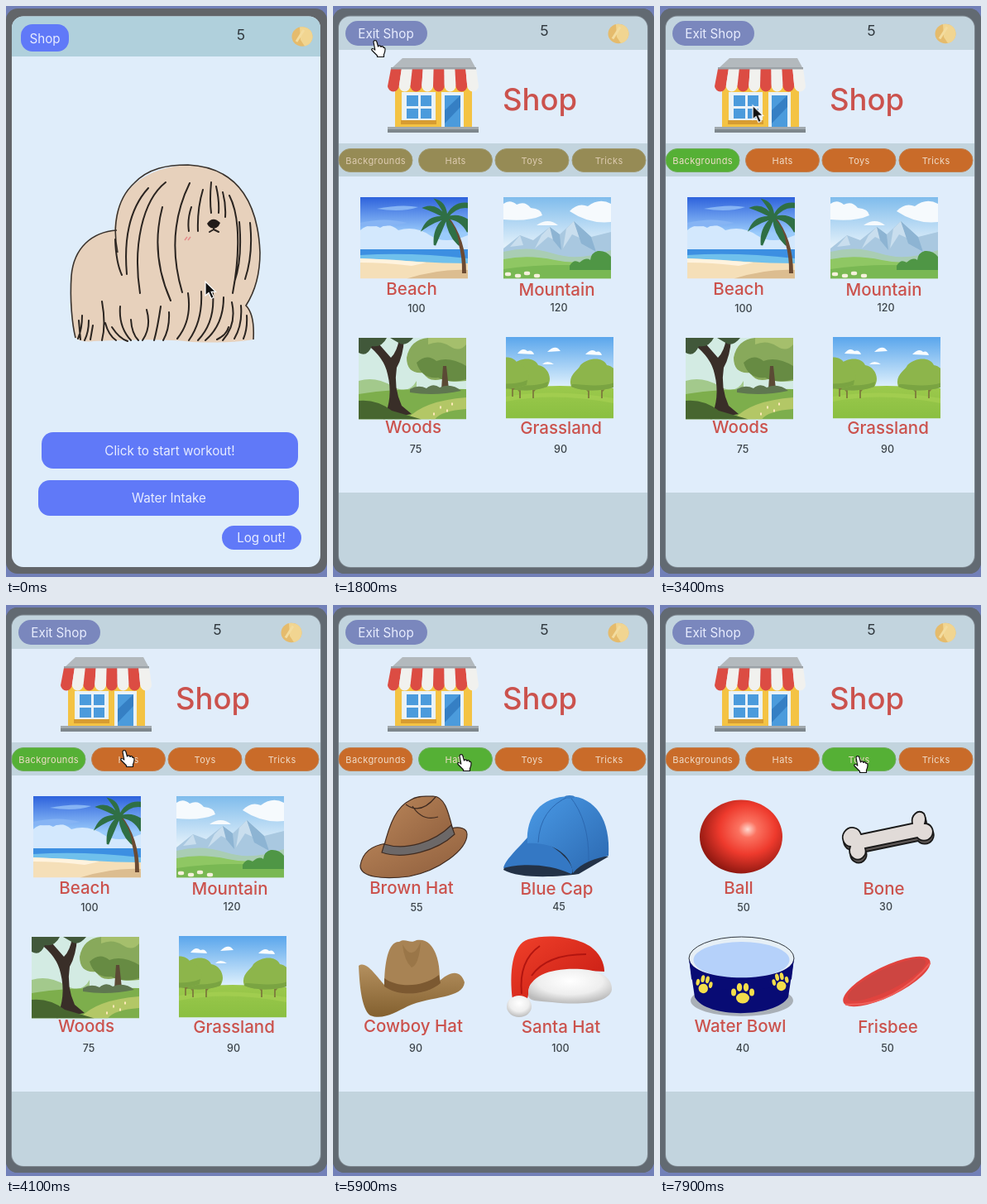
An HTML page for the animation above (8000 ms loop, 388 by 690 pixels).

```html
<!DOCTYPE html>
<html lang="en">
<head>
<meta charset="utf-8">
<title>Pet shop</title>
<style>
html, body { margin: 0; width: 100%; height: 100%; overflow: hidden; background: #7280b8; }
#stage { display: block; width: 100vw; height: 100vh; }
text { font-family: Inter, Roboto, sans-serif; text-anchor: middle; }
.btn { font-size: 15.2px; fill: #e8edff; }
.coins { font-size: 17.5px; fill: #30383e; }
.name { font-size: 20.5px; font-weight: 500; fill: #cb524d; }
.price { font-size: 12.5px; font-weight: 500; fill: #3c444a; }
.tab rect { fill: #c96b29; stroke: #b4662f; }
.tab text { font-size: 11px; letter-spacing: .4px; fill: #f0dcc8; }
.line { fill: none; stroke: #2a2420; stroke-width: 2; stroke-linecap: round; stroke-linejoin: round; }

.home, .shop, .p1, .p2, .p3, .hand, .arrow { animation: 8s step-end infinite; }
.home { animation-name: home; }
.shop { animation-name: shop; }
.p1 { animation-name: p1; }
.p2 { animation-name: p2; }
.p3 { animation-name: p3; }
.hand { animation-name: hand; }
.arrow { animation-name: arrow; }
.press { animation: press 8s step-end infinite; }
.t1 rect { animation: t1 8s linear infinite; }
.t2 rect { animation: t2 8s linear infinite; }
.t3 rect { animation: t3 8s linear infinite; }
.t4 rect { animation: t4 8s linear infinite; }
.tab text { animation: dim 8s linear infinite; }
.cursor { animation: move 8s ease-in-out infinite; }

@keyframes home { 0% { opacity: 1 } 22.45%, 100% { opacity: 0 } }
@keyframes shop { 0% { opacity: 0 } 22.45%, 100% { opacity: 1 } }
@keyframes p1 { 0% { opacity: 1 } 67.45%, 100% { opacity: 0 } }
@keyframes p2 { 0% { opacity: 0 } 67.45% { opacity: 1 } 89.95%, 100% { opacity: 0 } }
@keyframes p3 { 0% { opacity: 0 } 89.95%, 100% { opacity: 1 } }
@keyframes press { 0% { fill: #6079f8 } 19.95%, 100% { fill: #6b7fe0 } }
@keyframes t1 {
  0%, 22.8% { fill: #968b55; stroke: #a09a72 }
  25.5%, 67.45% { fill: #55b035; stroke: #6fae5c }
  67.46%, 100% { fill: #c96b29; stroke: #c08152 }
}
@keyframes t2 {
  0%, 22.8% { fill: #968b55; stroke: #a09a72 }
  25.5%, 67.45% { fill: #c96b29; stroke: #c08152 }
  67.46%, 89.95% { fill: #55b035; stroke: #6fae5c }
  89.96%, 100% { fill: #c96b29; stroke: #c08152 }
}
@keyframes t3 {
  0%, 22.8% { fill: #968b55; stroke: #a09a72 }
  25.5%, 89.95% { fill: #c96b29; stroke: #c08152 }
  89.96%, 100% { fill: #55b035; stroke: #6fae5c }
}
@keyframes t4 {
  0%, 22.8% { fill: #968b55; stroke: #a09a72 }
  25.5%, 100% { fill: #c96b29; stroke: #c08152 }
}
@keyframes dim { 0%, 22.8% { opacity: .8 } 25.5%, 100% { opacity: 1 } }
@keyframes hand { 0% { opacity: 0 } 12% { opacity: 1 } 31% { opacity: 0 } 47.4%, 100% { opacity: 1 } }
@keyframes arrow { 0% { opacity: 1 } 12% { opacity: 0 } 31% { opacity: 1 } 47.4%, 100% { opacity: 0 } }
@keyframes move {
  0%, 1% { transform: translate(241px, 333px) }
  15%, 28% { transform: translate(50px, 42px) }
  35% { transform: translate(82px, 64px) }
  50%, 52% { transform: translate(142px, 176px) }
  59%, 77.5% { transform: translate(154px, 181px) }
  86.5%, 100% { transform: translate(238px, 183px) }
}
</style>
</head>
<body>
<svg id="stage" viewBox="0 0 388 690" preserveAspectRatio="none">
<defs>
  <clipPath id="screen"><rect x="7" y="12.500" width="373" height="665.500" rx="14"/></clipPath>
  <linearGradient id="sky" x2="0" y2="1"><stop stop-color="#5aa6ec"/><stop offset=".6" stop-color="#dceffc"/></linearGradient>
  <linearGradient id="haze" x2="0" y2="1"><stop stop-color="#7fbcec"/><stop offset=".6" stop-color="#e2f0fa"/></linearGradient>
  <linearGradient id="deep" x2="0" y2="1"><stop stop-color="#2d62dc"/><stop offset=".66" stop-color="#9acbfb"/></linearGradient>
  <linearGradient id="grass" x2="0" y2="1"><stop stop-color="#9cc94c"/><stop offset="1" stop-color="#8abf42"/></linearGradient>
  <linearGradient id="cap" x2="1" y2="1"><stop stop-color="#4a9ae6"/><stop offset="1" stop-color="#2b68b0"/></linearGradient>
  <linearGradient id="felt" x2="1" y2="1"><stop stop-color="#b98559"/><stop offset="1" stop-color="#8d5d3c"/></linearGradient>
  <linearGradient id="tan" x2="0" y2="1"><stop stop-color="#b4905f"/><stop offset="1" stop-color="#83602f"/></linearGradient>
  <linearGradient id="red" x2="1" y2="1"><stop stop-color="#f0402a"/><stop offset="1" stop-color="#c41a12"/></linearGradient>
  <radialGradient id="fur" cx=".5" cy=".35" r=".65"><stop stop-color="#fff"/><stop offset=".6" stop-color="#eee"/><stop offset="1" stop-color="#bbb"/></radialGradient>
  <radialGradient id="ball" cx=".58" cy=".4" r=".62"><stop stop-color="#ffd9cf"/><stop offset=".18" stop-color="#fb7260"/><stop offset=".55" stop-color="#ee3a2d"/><stop offset="1" stop-color="#8e1710"/></radialGradient>
  <g id="coin"><ellipse rx="12.500" ry="11.800" fill="#e5bb6c"/><path d="M-3-11.500A12.500 11.800 0 0 1 3 11.500L-2 4Z" fill="#f1d591"/><path d="M-7 6L2-8" stroke="#f3dc9f" stroke-width="3"/></g>
  <g id="paw"><ellipse cy="4" rx="8" ry="6.5"/><ellipse cx="-11" cy="-3" rx="3" ry="4.5"/><ellipse cx="-4" cy="-9" rx="3.2" ry="5"/><ellipse cx="4" cy="-9" rx="3.2" ry="5"/><ellipse cx="11" cy="-3" rx="3" ry="4.5"/></g>
  <path id="bone" d="M243 277L305 264C303 254 312 246 319 252C322 257 321 261 320 264C327 264 333 272 328 280C323 287 314 285 311 281L248 294C251 303 242 311 234 306C229 303 228 297 230 292C222 291 218 281 223 274C229 266 240 268 243 277Z" stroke="#191919" stroke-width="1.800"/>
  <g id="tree"><path d="M-8 5V20M8 5V20M-8 12L-14 5M8 12L14 5" stroke="#7d7a3c" stroke-width="1.800" fill="none"/><path d="M-29 6C-34-8-20-14-18-20C-8-30 10-30 14-20C26-18 32-4 25 6C10 12-16 12-29 6Z" fill="#8db54b"/><path d="M-28 3C-14 3 8 8 26 0L25 6C10 12-16 12-29 6Z" fill="#7aa442"/></g>
</defs>

<rect width="388" height="690" fill="#7280b8"/>
<rect y="3" width="388" height="683" rx="14" fill="#626569"/>

<g class="home">
  <g clip-path="url(#screen)">
    <rect width="388" height="690" fill="#dfedfa"/>
    <rect width="388" height="61" fill="#b0d0dc"/>
  </g>
  <rect class="press" x="18" y="22" width="58" height="33" rx="14"/>
  <text class="btn" x="47" y="45">Shop</text>
  <text class="coins" x="284" y="41">5</text>
  <use href="#coin" x="358" y="37"/>
  <g fill="#6079f8">
    <rect x="43" y="515" width="310" height="44" rx="14"/>
    <rect x="39" y="573" width="315" height="43" rx="14"/>
    <rect x="261" y="628" width="96" height="29" rx="14.5"/>
  </g>
  <text class="btn" x="198" y="543">Click to start workout!</text>
  <text class="btn" x="197" y="600">Water Intake</text>
  <text class="btn" x="308.500" y="648">Log out!</text>

  <g stroke="#39322c" stroke-width="1.6" fill="#e7d1bc">
    <path d="M134 271C104 273 82 292 79 326C77 355 80 385 84 401Q92 407 106 405Q190 401 225 406Q270 408 299 403C300 386 298 370 291 361C301 345 307 322 307 298C305 245 285 195 220 192C168 195 132 222 131 271" stroke="none"/>
    <path d="M134 271C104 273 82 292 79 326C77 355 80 385 84 401" fill="none"/>
    <path d="M135 298C129 270 132 235 155 214C172 196 195 192 220 192C285 195 305 245 307 298C307 322 301 345 290 362C298 370 300 386 299 403" fill="none"/>
  </g>
  <path class="line" d="M132 282Q133 310 140 325M172 220Q140 255 146 324M193 213C165 235 153 290 162 347M189 243Q174 300 199 356M222 214Q192 275 213 346M224 243Q219 258 221 272M238 222Q231 245 232 272M248 213Q246 235 248 250M254 218Q258 235 257 250M262 225Q266 240 265 255M270 229C286 260 280 315 274 347M282 261Q286 305 276 334M295 262Q299 300 289 330"/>
  <path class="line" d="M92 374Q92 390 87 402M100 380Q100 394 95 404M88 380L90 403M105 386L102 403M116 357Q121 385 116 404M120 383Q124 398 133 404M138 363Q136 388 151 404M128 388Q137 402 147 405M151 379Q152 396 160 404M170 367Q176 388 165 404M187 363Q183 390 179 404M197 370Q198 390 190 404M220 347Q225 380 207 402M236 345Q238 380 221 404M250 347Q253 382 232 404M263 352Q263 385 241 404M273 358Q279 385 262 404M284 362Q286 385 276 402M269 388Q266 398 255 403M291 374Q292 390 287 402"/>
  <path d="M243 263Q250 253 259 262Q257 268 251 269Q245 268 243 263Z" fill="#211b19"/>
  <path class="line" d="M251 267V270L246 273M251 270L257 273"/>
  <path d="M216 283L219 279M220 283L223 279" stroke="#e58c8c" stroke-width="1.6"/>
</g>

<g class="shop">
  <rect y="3" width="388" height="683" rx="14" fill="#626a72"/>
  <rect x="7" y="12.500" width="373" height="665.500" rx="14" fill="none" stroke="#7b858d" stroke-width="2"/>
  <g clip-path="url(#screen)">
    <rect width="388" height="690" fill="#c2d4de"/>
    <rect y="53" width="388" height="113" fill="#e1edfa"/>
    <rect y="206" width="388" height="382" fill="#e0edfb"/>
  </g>
  <rect x="15" y="18" width="99" height="30" rx="15" fill="#7a87bd"/>
  <text class="btn" x="64" y="39">Exit Shop</text>
  <text class="coins" x="255.500" y="36">5</text>
  <use href="#coin" x="345" y="33.500"/>

  <g>
    <path d="M75 96H168V147H75Z" fill="#f4c343"/>
    <path d="M83 104H124V139H83ZM131 104H158V147H131Z" fill="#e9f2f8"/>
    <path d="M89 108H103V121H89ZM106 108H119V121H106ZM89 124H103V136H89ZM106 124H119V136H106ZM135 108H154V146H135Z" fill="#4b9bdc"/>
    <path d="M135 126L154 108V122L135 142Z" fill="#357fc4"/>
    <path d="M82 138H125V143H82Z" fill="#d79c32"/>
    <path d="M66 146H176V153H66Z" fill="#7e878d"/>
    <path d="M66 146H176V149H66Z" fill="#a1a9ae"/>
    <g id="awning"></g>
    <path d="M84 63H166L173 76H70Z" fill="#b3b9bd"/>
    <path d="M70 74H173V76.500H70Z" fill="#9ba2a7"/>
  </g>
  <text x="250" y="126" font-size="36.500" font-weight="500" fill="#cb524d">Shop</text>
  <g id="tabs"></g>

  <g class="p1" id="p1">
    <svg x="33" y="231" width="130" height="98.500">
      <rect width="130" height="66" fill="url(#deep)"/>
      <path d="M0 40Q12 30 24 37Q34 30 46 40Q66 34 84 46T130 46V64H0Z" fill="#d3e8fd"/>
      <path d="M0 31Q30 24 56 31Q40 36 0 35ZM20 14Q50 8 70 12Q50 19 20 14Z" fill="#86b4f4"/>
      <path d="M0 63H130V82H0Z" fill="#3c8fe2"/>
      <path d="M0 70Q60 66 130 74V84H0Z" fill="#6fc0ec"/>
      <path d="M0 74Q40 76 70 78T130 80V98.500H0Z" fill="#f5dfb8"/>
      <path d="M0 74Q40 75 80 79L62 83Q30 79 0 79Z" fill="#fff3de"/>
      <path d="M56 98.500Q96 86 130 88V98.500Z" fill="#dcbd90"/>
      <path d="M103 25Q124 52 123 92H128Q128 50 106 23Z" fill="#6b4a32"/>
      <path d="M104 25Q92 8 78 13Q90 17 104 25Q84 21 76 38Q90 28 104 25Q88 36 90 58Q97 42 104 25Q106 45 118 56Q116 38 104 25Q122 26 130 42V28Q118 20 104 25Q116 10 130 12V8Q112 6 104 25Q104 8 92 4Q100 14 104 25Z" fill="#2f6f45" stroke="#2f6f45" stroke-width="2.500"/>
    </svg>
    <svg x="206" y="231" width="130" height="98.500">
      <rect width="130" height="98.500" fill="url(#haze)"/>
      <path d="M0 8Q8 2 16 9Q26 4 33 13Q46 14 47 22Q30 30 0 27ZM80 17Q90 6 102 11Q116 0 130 8V30Q104 33 80 17ZM40 34Q54 24 66 34Z" fill="#f6fafd"/>
      <path d="M0 62L20 46L36 52L56 36L68 45L85 29L106 48L130 42V78H0Z" fill="#a9c8e0"/>
      <path d="M56 36L62 52L54 48L38 62L46 46ZM85 29L94 50L83 45L72 62L76 38ZM20 46L24 58L8 60Z" fill="#c9deee"/>
      <path d="M85 29L106 48L112 66L94 56ZM56 36L68 45L70 64L60 52Z" fill="#8db4d3"/>
      <path d="M0 66Q30 58 60 68T130 64V80H0Z" fill="#a9cdb4"/>
      <path d="M0 75Q30 69 62 76T130 72V98.500H0Z" fill="#8fc763"/>
      <path d="M0 87Q60 78 130 85V98.500H0Z" fill="#79b853"/>
      <path d="M80 83Q85 74 92 79Q100 72 105 76Q106 67 114 65Q124 64 130 72V88H80Z" fill="#4f9645"/>
      <path d="M4 93h3m9 2h3m8-3h3m9 3h3" stroke="#f6f0dc" stroke-width="4.500" stroke-linecap="round"/>
    </svg>
    <svg x="31" y="401" width="130" height="98.500">
      <rect width="130" height="98.500" fill="#d3ebe3"/>
      <path d="M0 52Q20 46 40 58T70 52V98.500H0Z" fill="#a3c98c"/>
      <path d="M58 24Q62 2 84 0H130V52Q110 54 100 50Q84 54 78 42Q58 44 58 24Z" fill="#88a95b"/>
      <path d="M70 30Q82 18 94 28Q110 22 130 34V50Q112 56 96 48Q76 50 70 30Z" fill="#678b43"/>
      <path d="M84 8Q98 2 110 10T130 8V0H84Z" fill="#a5bf6c"/>
      <path d="M102 34H106L109 62H100Z" fill="#5b4a35"/>
      <path d="M0 68Q50 60 130 62V98.500H0Z" fill="#7dae4c"/>
      <path d="M62 62Q72 56 82 61Q90 54 98 60Q112 54 124 64Q92 71 62 66Z" fill="#5f7750"/>
      <path d="M58 98.500Q78 76 130 72V86Q100 88 92 98.500Z" fill="#b3c766"/>
      <path d="M30 98.500Q42 72 35 44Q31 24 10 8L4 10V0H18Q32 16 39 24Q47 16 49 0H55Q54 22 46 36Q42 60 52 82L64 92Z" fill="#392e28"/>
      <path d="M0 0H34Q28 12 16 10Q10 24 0 18ZM38 0H66Q58 10 50 7Z" fill="#41583a"/>
      <path d="M0 76Q22 74 40 88L76 98.500H0Z" fill="#47662f"/>
      <path d="M98 84h2m6 4h2m4-8h2m-24 12h2" stroke="#ffe9b8" stroke-width="3"/>
    </svg>
    <svg x="209" y="400" width="130" height="98.500">
      <rect width="130" height="98.500" fill="url(#sky)"/>
      <path d="M14 20Q20 12 26 17Q32 15 34 21ZM50 18Q60 8 66 17ZM96 21Q104 13 109 18Q114 16 116 22ZM44 33Q50 27 58 33Z" fill="#f8fcff"/>
      <path d="M0 62Q65 56 130 62V98.500H0Z" fill="url(#grass)"/>
      <path d="M0 72Q60 62 130 74V80Q60 66 0 78Z" fill="#a9d254" opacity=".6"/>
      <use href="#tree" x="25" y="54"/><use href="#tree" x="108" y="54"/><use href="#tree" x="0" y="52"/>
    </svg>
  </g>

  <g class="p2" id="p2">
    <g stroke="#402b20" stroke-width="1.200">
      <path d="M33 315C36 296 50 290 65 288L143 270C153 267 162 270 162 277C162 296 128 321 92 328C60 332 33 329 33 315Z" fill="url(#felt)"/>
      <path d="M61 294C69 262 77 244 93 236C104 229 114 232 121 231C136 231 140 253 146 276C124 296 84 306 61 294Z" fill="url(#felt)"/>
      <path d="M62 289C88 297 122 287 143 266L147 277C126 297 86 308 59 299Z" fill="#6c6868"/>
      <path d="M88 241Q106 254 124 232M96 243Q108 262 127 256" fill="none"/>
    </g>
    <path d="M236 284C222 299 209 310 206 320C224 331 270 329 297 325L333 304L270 290Z" fill="#233247"/>
    <path d="M236 280C221 297 208 308 206 318C225 312 262 312 288 325C296 318 272 288 236 280Z" fill="#3478c4"/>
    <path d="M235 288C233 254 251 232 286 231C317 232 336 260 333 303C318 306 300 311 290 324C288 300 264 286 235 288Z" fill="url(#cap)"/>
    <path d="M286 231Q250 246 248 287M286 231Q310 260 309 310" fill="none" stroke="#2c68b0"/>
    <ellipse cx="286" cy="232" rx="6" ry="2" fill="#3b80c9"/>
    <path d="M31 436C40 429 52 448 63 460C88 470 112 464 127 456C141 442 154 440 159 456C157 476 119 472 90 485C76 492 60 502 45 496C34 488 32 456 31 436Z" fill="url(#tan)"/>
    <path d="M62 461C62 432 67 406 80 407C88 402 93 410 101 405C113 403 120 411 124 421C130 436 128 448 130 457C112 472 80 474 62 461Z" fill="#a88354"/>
    <path d="M62 451C80 464 111 461 128 447L130 457C112 472 80 474 62 461Z" fill="#7c5931"/>
    <path d="M84 410Q96 432 106 407Q104 435 95 438Q86 430 84 410Z" fill="#9a7648"/>
    <path d="M217 477C213 445 216 410 236 404C264 396 300 403 314 415C326 425 328 437 328 443C300 441 260 442 239 458C234 466 238 471 234 477Z" fill="url(#red)"/>
    <path d="M228 470Q224 430 250 412M240 448Q258 422 306 422" fill="none" stroke="#b21510" stroke-width="2"/>
    <path d="M236 470C236 446 268 438 300 440C325 442 338 451 337 465C334 481 300 484 265 480C246 478 236 480 236 470Z" fill="url(#fur)"/>
    <ellipse cx="225" cy="485" rx="15" ry="13" fill="url(#fur)"/>
  </g>

  <g class="p3" id="p3">
    <ellipse cx="98" cy="280" rx="50" ry="44.500" fill="url(#ball)"/>
    <use href="#bone" x="1" y="4" fill="#5d5755"/>
    <use href="#bone" fill="#e1dbd8"/>
    <ellipse cx="99" cy="478" rx="62" ry="19" fill="#a9b0b7"/>
    <path d="M35 427L42 474C56 500 140 499 155 474L162 427Z" fill="#080b74"/>
    <ellipse cx="98.500" cy="427" rx="63.500" ry="26" fill="#e6eff6" stroke="#30363c"/>
    <ellipse cx="98.500" cy="429" rx="58" ry="22" fill="#b5d1fa"/>
    <path d="M35 427C38 458 159 458 162 427L159 452C140 470 58 470 38 452Z" fill="#080b74"/>
    <g fill="#f4de4b">
      <use href="#paw" x="100" y="471"/>
      <use href="#paw" transform="translate(53 460) rotate(12) scale(.72 .88)"/>
      <use href="#paw" transform="translate(146 457) rotate(-12) scale(.72 .88)"/>
    </g>
    <g transform="translate(274 455) rotate(-26)">
      <ellipse rx="58" ry="18" fill="#e0433e"/>
      <ellipse cx="1" cy="-2" rx="52" ry="13" fill="#cd4541"/>
      <path d="M-57 3Q-30 18 0 17T57 3" fill="none" stroke="#f0605a" stroke-width="2"/>
    </g>
  </g>
</g>

<g class="cursor">
  <path class="arrow" d="M0 0V17L4 13.500L7 20.500L10.200 19L7.200 12.300H12.500Z" fill="#111" stroke="#fff" stroke-width="1.200"/>
  <path class="hand" d="M-1 1.500C-1-1 2.500-1 3 1.500L4.500 7C5 5.500 7.500 5.500 8 7.500C8.500 6 11 6.500 11 8.500C12 7.500 13 8.500 13 10.500C13 14 12 15 11.500 16.500V19.500H3.500V18C1.500 16-1 13.500-3 11.500C-4 9.500-2 8.500 .8 11Z" fill="#fff" stroke="#111" stroke-width="1.200" stroke-linejoin="round"/>
</g>
</svg>
<script>
const add = (id, markup) => document.getElementById(id).insertAdjacentHTML("beforeend", markup);

// striped awning with rounded ends
for (let i = 0; i < 8; i++) {
  const a = 70 + i * 12.9, b = 66 + i * 13.75;
  add("awning", `<path d="M${a} 76H${a + 12.9}L${b + 13.75} 97a6.9 7 0 0 1 -13.75 0Z" fill="${i % 2 ? "#f1f1ee" : "#dc4c43"}"/>`);
}

[["Backgrounds", 7], ["Hats", 103.5], ["Toys", 196], ["Tricks", 289]].forEach(([name, x], i) =>
  add("tabs", `<g class="tab t${i + 1}"><rect x="${x}" y="172.500" width="89" height="28" rx="14"/><text x="${x + 44.7}" y="190.500">${name}</text></g>`));

const spots = [[95, 349, 101, 370], [270.5, 350, 273, 369], [97, 516, 100, 540], [275.5, 517, 275, 540]];
const goods = {
  p1: ["Beach", 100, "Mountain", 120, "Woods", 75, "Grassland", 90],
  p2: ["Brown Hat", 55, "Blue Cap", 45, "Cowboy Hat", 90, "Santa Hat", 100],
  p3: ["Ball", 50, "Bone", 30, "Water Bowl", 40, "Frisbee", 50]
};
for (const page in goods)
  spots.forEach(([x, y, px, py], i) => add(page,
    `<text class="name" x="${x}" y="${y}">${goods[page][2 * i]}</text><text class="price" x="${px}" y="${py}">${goods[page][2 * i + 1]}</text>`));
</script>
</body>
</html>
```
